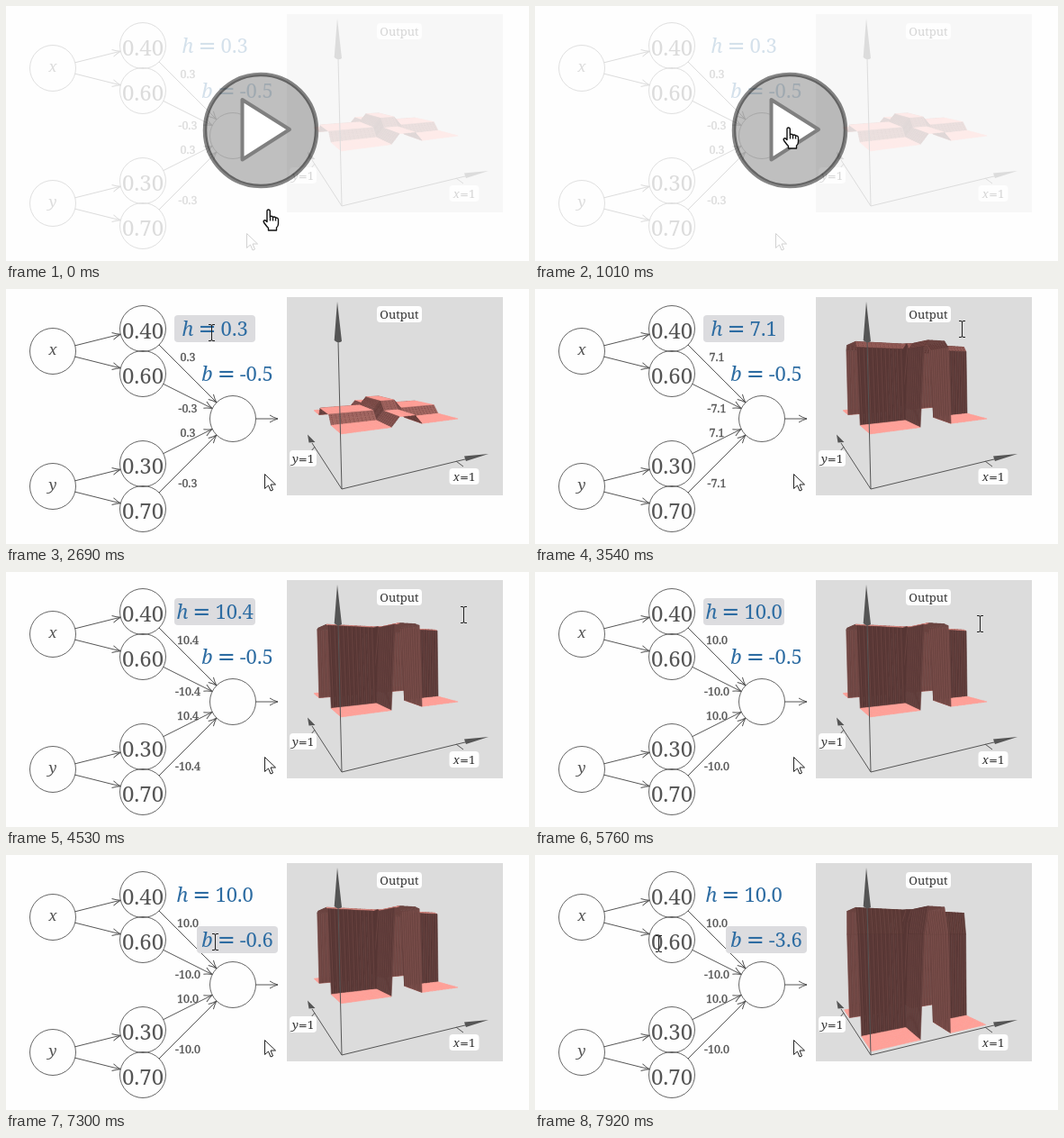
These frames come from a looping animation (581x283 px, 7990 ms). An HTML page with a canvas:

```html
<!DOCTYPE html>
<html lang="en">
<head>
<meta charset="utf-8">
<title>Tower function</title>
<style>
  html, body { margin: 0; width: 100%; height: 100%; overflow: hidden; background: #fefefe; }
  canvas, svg { position: absolute; left: 0; top: 0; }
  text { font-family: "Noto Serif", serif; text-anchor: middle; fill: #555; }
  .it { font-style: italic; }
  .eq { font-family: "DejaVu Sans", sans-serif; }
  .weight { stroke: #555; stroke-width: .3px; }
  .param text { font-size: 22px; fill: #2d6ca2; }
  .param .eq { font-size: 24px; }
  .param rect { fill: #dcdcdf; }
  .line { fill: none; stroke: #555; }
  .tag rect { fill: #fefefe; }
  .tag text { font-size: 13px; fill: #333; }
</style>
</head>
<body>
<canvas id="plot" width="581" height="283"></canvas>
<svg id="stage" width="581" height="283"></svg>
<script>
const LOOP = 7990, N = 30, R = 25.5;
const $ = id => document.getElementById(id);
const ctx = $('plot').getContext('2d');

// ---- static drawing ----
const nodes = {
  x: [52, 69], y: [52, 219], a: [152, 44], b: [152, 94],
  c: [152, 194], d: [152, 244], out: [252, 144]
};

function circle([x, y]) {
  return `<circle class="line" cx="${x}" cy="${y}" r="${R}" stroke-width=".9"/>`;
}

function link(from, to) {
  const [x1, y1] = nodes[from], [x2, y2] = nodes[to];
  const k = R / Math.hypot(x2 - x1, y2 - y1), dx = (x2 - x1) * k, dy = (y2 - y1) * k;
  return arrow(x1 + dx, y1 + dy, x2 - dx, y2 - dy);
}

function arrow(x1, y1, x2, y2) {
  return `<path class="line" d="M${x1} ${y1}L${x2} ${y2}" marker-end="url(#head)"/>`;
}

function label(x, y, size, str, attrs = '') {
  return `<text x="${x}" y="${y}" font-size="${size}" ${attrs}>${str}</text>`;
}

function param(name, x, y) {
  return `<g class="param"><rect id="${name}Box" x="${x - 45}" y="${y - 22.5}" width="90" height="30" rx="4"/>
    <text x="${x}" y="${y}"><tspan class="it">${name}</tspan><tspan class="eq" dx="5">=</tspan><tspan id="${name}Val" dx="5"></tspan></text></g>`;
}

function tag(x, y, w, str) {
  return `<g class="tag"><rect x="${x - w / 2}" y="${y - 9}" width="${w}" height="18" rx="4"/>${label(x, y + 4.5, 13, str)}</g>`;
}

const unit = v => `<tspan class="it">${v}</tspan><tspan class="eq" font-size="12">=</tspan>1`;
const pointer = 'M0 0V16L4 12.5L6.5 18.5L9 17.5L6.5 11.5H12Z';
const weightY = [80, 136.5, 164, 219.5];

$('stage').innerHTML = `
  <defs><marker id="head" markerWidth="12" markerHeight="12" refX="10" refY="6" orient="auto" markerUnits="userSpaceOnUse">
    <path class="line" d="M1 2Q6 5 10 6Q6 7 1 10"/></marker></defs>
  ${Object.values(nodes).map(circle).join('')}
  ${['x a', 'x b', 'y c', 'y d', 'a out', 'b out', 'c out', 'd out'].map(p => link(...p.split(' '))).join('')}
  ${arrow(277.5, 144, 302, 144)}
  ${label(52, 73, 17, 'x', 'class="it"')}${label(52, 223, 17, 'y', 'class="it"')}
  ${[['0.40', 'a'], ['0.60', 'b'], ['0.30', 'c'], ['0.70', 'd']].map(([s, n]) => label(152, nodes[n][1] + 10.5, 24, s)).join('')}
  ${weightY.map((y, i) => label(202, y, 12.5, '', `id="w${i}" class="weight"`)).join('')}
  ${param('h', 232, 51.5)}${param('b', 257, 101.5)}
  <path class="line" d="M369 58L373 222L512 188.5M373 222L340 171M500 191L508 197M343 175L339 180"/>
  <path fill="#555" d="M368 14L364.7 57Q369 61 373 58ZM536 183L509 185.5L511 191ZM335 161.5L336.5 170.5L343.5 170Z"/>
  ${tag(437, 28, 50, 'Output')}${tag(509, 208, 33, unit('x'))}${tag(330, 188, 30, unit('y'))}
  <path id="idle" d="${pointer}" fill="#fff" stroke="#222"/>
  <g id="cover">
    <rect width="581" height="283" fill="#fefefe" opacity=".8"/>
    <circle cx="283" cy="138" r="62" fill-opacity=".25" stroke="#000" stroke-opacity=".48" stroke-width="4.5"/>
    <path d="M262.5 104V170.5L315 137Z" fill="#fff" stroke="#808080" stroke-width="4" stroke-linejoin="round"/>
    <circle id="press" cx="281" cy="134" r="12" fill-opacity=".15"/>
  </g>
  <g id="cursor">
    <path id="hand" fill="#fff" stroke="#111" stroke-width="1.4" stroke-linejoin="round"
      d="M-1.5 14V2Q-1.5 .5 0 .5T1.8 2V9Q2 7.5 3.5 7.7T5 9.5Q5.3 8.2 6.7 8.5T8 10.3Q8.5 9.3 9.7 9.7T11 11.5V16Q11 19 9 20.5V23.5H0V21Q-2 19-4.5 15.5Q-6 13.5-4.8 12.5T-1.5 14ZM2 9V13M5 10V13M8 11V13"/>
    <path id="point" d="${pointer}" fill="#fff" stroke="#111"/>
    <path id="beam" fill="none" stroke="#222" d="M-3.5-9H-1.5Q0-9 0-7.5Q0-9 1.5-9H3.5M0-7.5V7.5M-3.5 9H-1.5Q0 9 0 7.5Q0 9 1.5 9H3.5"/>
  </g>`;

// ---- surface ----
function project(x, y, z) {
  const w = 1 + .293 * x + .548 * y - .072 * z;
  return [373.8 + (164 * x - 46.6 * y - 4.2 * z) / w, 222 - (39.3 * x + 73.4 * y + 157.5 * z) / w];
}

const step = d => d > 0 ? 1 : d < 0 ? 0 : .5;
const bump = (i, lo, hi) => step(i - lo) - step(i - hi);

function drawSurface(h, b) {
  const height = (i, j) => 1 / (1 + Math.exp(-h * (bump(i, 12, 18) + bump(j, 9, 21)) - b));
  const z = [], pt = [];
  for (let i = 0; i <= N; i++) {
    z[i] = []; pt[i] = [];
    for (let j = 0; j <= N; j++) {
      z[i][j] = height(i, j);
      pt[i][j] = project(i / N, j / N, z[i][j]);
    }
  }
  const mid = (p, q) => [(p[0] + q[0]) / 2, (p[1] + q[1]) / 2];

  ctx.clearRect(0, 0, 581, 283);
  ctx.fillStyle = '#dcdcdc';
  ctx.fillRect(312, 9, 240, 220);

  // far corner first
  for (let i = N - 1; i >= 0; i--) for (let j = N - 1; j >= 0; j--) {
    const [p, q, r, s] = [pt[i][j], pt[i + 1][j], pt[i + 1][j + 1], pt[i][j + 1]];
    const sx = (z[i + 1][j] + z[i + 1][j + 1] - z[i][j] - z[i][j + 1]) * N / 2;
    const sy = (z[i][j + 1] + z[i + 1][j + 1] - z[i][j] - z[i + 1][j]) * N / 2;
    const steep = Math.hypot(sx, sy), nz = 1 / Math.hypot(1, steep);
    const below = (r[0] - p[0]) * (s[1] - q[1]) > (r[1] - p[1]) * (s[0] - q[0]);
    const lit = .33 + .67 * nz * nz - .15 * Math.max(0, sx) * nz;
    const k = below ? .42 : Math.max(.34, lit);
    ctx.fillStyle = ctx.strokeStyle = `rgb(${255 * k},${160 * k},${152 * k})`;
    ctx.lineWidth = .6;
    ctx.setLineDash([]);
    ctx.beginPath();
    for (const v of [p, q, r, s]) ctx.lineTo(...v);
    ctx.closePath();
    ctx.fill();
    ctx.stroke();
    if (steep < .7) continue;

    // mesh lines running up the slope
    const along = Math.abs(sy) > Math.abs(sx);
    ctx.strokeStyle = steep > 3 ? 'rgba(255,175,170,.13)' : 'rgba(60,25,25,.5)';
    ctx.lineWidth = .8;
    ctx.setLineDash(steep > 3 ? [] : [1, 1]);
    ctx.beginPath();
    for (const [u, v] of along ? [[p, s], [mid(p, q), mid(s, r)]] : [[p, q], [mid(p, s), mid(q, r)]]) {
      ctx.moveTo(...u);
      ctx.lineTo(...v);
    }
    ctx.stroke();
  }
}

// ---- motion ----
const hKeys = [[2760, .3], [3540, 7.1], [3920, 10.4], [4000, 10.5], [4990, 10.3], [5760, 10]];
const bKeys = [[6990, -.5], [7300, -.6], [7530, -2.4], [7620, -2.4], [7920, -3.6]];
const path = [
  [550, 291, 225], [1010, 281, 134], [1530, 281, 134], [2230, 228, 48], [2690, 228, 48],
  [3540, 474, 44], [3850, 510, 45], [4300, 510, 45], [4760, 506, 48], [5460, 499, 53],
  [5610, 494, 57], [5920, 494, 57], [6150, 330, 150], [6300, 174, 237], [6450, 292, 96],
  [6700, 292, 96], [6990, 236, 96], [7300, 232, 96], [7530, 193, 97], [7620, 193, 97], [7920, 137, 98]
];

function at(keys, t, n = 1) {
  const i = keys.findIndex(k => k[0] > t);
  if (i < 0) return keys[keys.length - 1][n];
  if (!i) return keys[0][n];
  const a = keys[i - 1], b = keys[i];
  return a[n] + (b[n] - a[n]) * (t - a[0]) / (b[0] - a[0]);
}

const show = (id, on) => { $(id).style.display = on ? '' : 'none'; };
const move = (id, x, y) => $(id).setAttribute('transform', `translate(${x} ${y})`);
let last = '';

function render(t) {
  const h = at(hKeys, t).toFixed(1), b = at(bKeys, t).toFixed(1);
  if (h + b !== last) {
    last = h + b;
    drawSurface(+h, +b);
    $('hVal').textContent = h;
    $('bVal').textContent = b;
    weightY.forEach((_, i) => { $('w' + i).textContent = (i % 2 ? '-' : '') + h; });
  }
  show('hBox', t >= 2300 && t < 6000);
  show('bBox', t >= 6760);
  show('cover', t < 1470);
  show('press', t >= 1240);
  show('idle', t < 2230 || t >= 2300);
  t < 2300 ? move('idle', 267.5, 252.5) : move('idle', 287.5, 205.5);

  const shape = t < 1470 ? 'hand' : t < 2200 || (t >= 6000 && t < 6760) ? 'point' : 'beam';
  for (const s of ['hand', 'point', 'beam']) show(s, s === shape);
  move('cursor', Math.round(at(path, t, 1)) + .5, Math.round(at(path, t, 2)) + .5);
}

const start = performance.now();
function frame() {
  render((performance.now() - start) % LOOP);
  requestAnimationFrame(frame);
}
frame();
</script>
</body>
</html>
```
